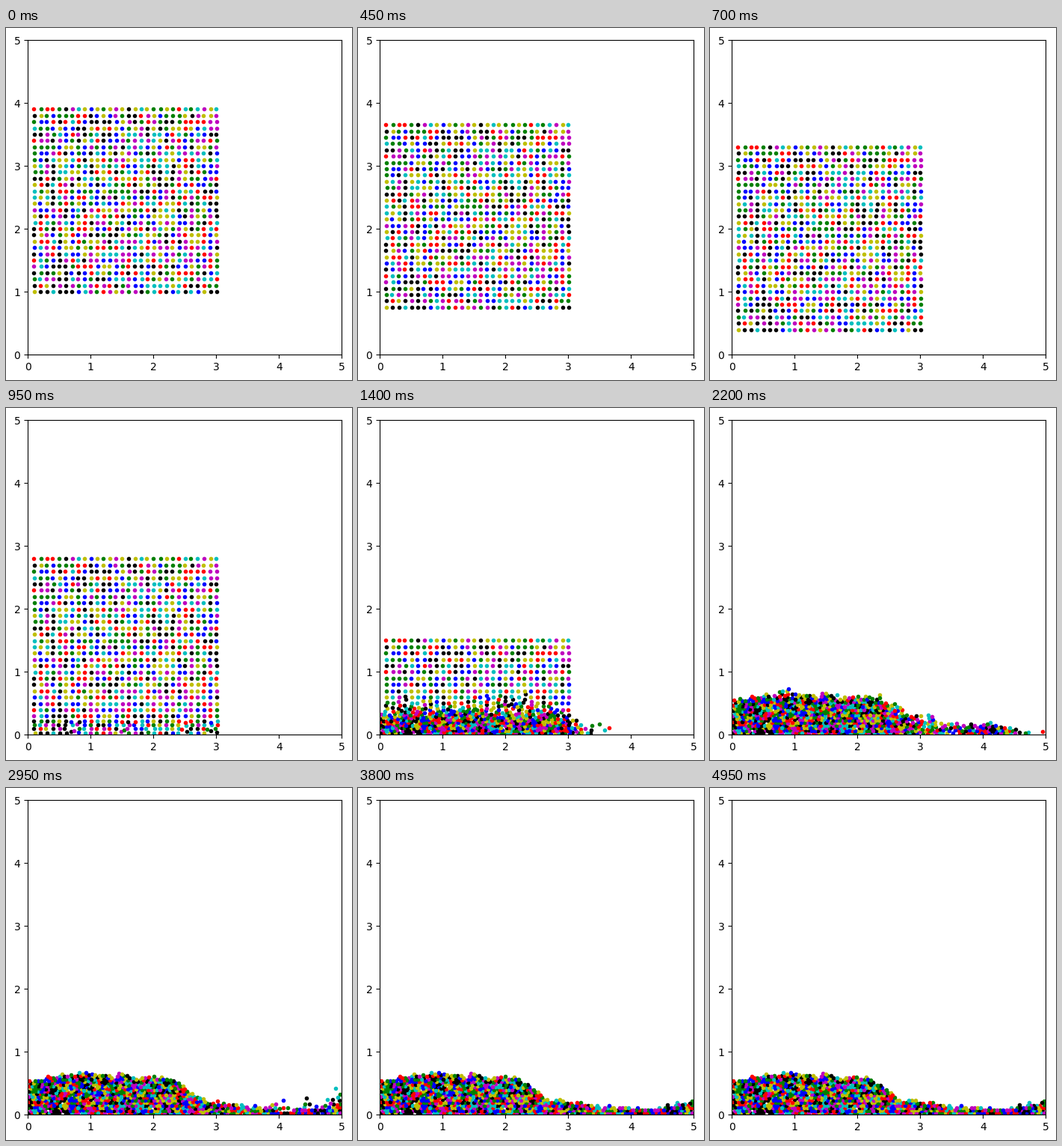
These frames come from a looping animation (463x470 px, 5 s). A matplotlib script:

```python
import numpy as np
import matplotlib.pyplot as plt
from matplotlib.animation import FuncAnimation

# Stage, in pixels
WIDTH, HEIGHT, DPI = 463, 470, 100
LEFT, RIGHT, BOTTOM, TOP = 29.0, 449.4, 33.5, 453.5
BOX = 5.0

# Time
FRAMES, INTERVAL = 100, 50
STEPS = 70
DT = 0.025 / STEPS

# Grains of unit mass
SIDE = 30
N = SIDE * SIDE
RADIUS = 0.024
REACH = 0.08
GRAVITY = np.array([0.0, -9.81])
STIFF, DAMP = 1e6, 85.0
SHEAR_STIFF, SHEAR_DAMP = 5e5, 40.0
GRAIN_FRICTION, WALL_FRICTION = 0.25, 0.15

IDS = np.arange(N)
WALL_NORMALS = np.repeat([[0.0, 1.0], [1.0, 0.0], [-1.0, 0.0]], N, axis=0)
WALL_FIRST = np.tile(IDS, 3)
WALL_SECOND = np.repeat([N, N + 1, N + 2], N)


def start_grid(rng):
    """Square block of grains with a little sideways jitter."""
    row, col = np.divmod(IDS, SIDE)
    x = 0.1 * (col + 1) + rng.uniform(0, 0.02, N)
    return np.column_stack([x, 1 + 0.1 * row])


def close_pairs(pos):
    """Index pairs nearer than REACH, found by a sweep along x."""
    order = np.argsort(pos[:, 0])
    x, y = pos[order].T
    count = np.searchsorted(x, x + REACH) - IDS - 1
    a = np.repeat(IDS, count)
    b = a + 1 + np.arange(count.sum()) - np.repeat(np.cumsum(count) - count, count)
    near = np.hypot(x[a] - x[b], y[a] - y[b]) < REACH
    a, b = order[a[near]], order[b[near]]
    return np.minimum(a, b), np.maximum(a, b)


class Grains:
    def __init__(self, pos):
        self.pos = pos
        self.vel = np.zeros((N + 3, 2))  # the last three are the still walls
        self.memory = np.zeros(N * (N + 3))
        self.keys = np.zeros(0, int)
        self.slip = np.zeros(0)
        self.find_contacts()

    def find_contacts(self):
        self.a, self.b = close_pairs(self.pos)
        self.first = np.concatenate([self.a, WALL_FIRST])
        self.second = np.concatenate([self.b, WALL_SECOND])
        self.friction = np.full(len(self.first), WALL_FRICTION)
        self.friction[:len(self.a)] = GRAIN_FRICTION
        # Carry the tangential springs over to the new list
        keys = self.first * (N + 3) + self.second
        self.memory[self.keys] = self.slip
        slip = self.memory[keys]
        self.memory[self.keys] = 0
        self.keys, self.slip = keys, slip
        self.anchor = self.pos.copy()

    def contact_force(self):
        x, y = self.pos.T
        apart = self.pos[self.a] - self.pos[self.b]
        dist = np.hypot(apart[:, 0], apart[:, 1])
        gap = np.concatenate([dist - 2 * RADIUS, y - RADIUS,
                              x - RADIUS, BOX - x - RADIUS])
        hit = np.flatnonzero(gap < 0)
        normals = np.concatenate([apart / dist[:, None], WALL_NORMALS])
        nx, ny = normals[hit].T
        i, j = self.first[hit], self.second[hit]
        vx, vy = (self.vel[i] - self.vel[j]).T

        push = np.maximum(-STIFF * gap[hit] - DAMP * (vx * nx + vy * ny), 0)
        limit = self.friction[hit] * push
        slide = vy * nx - vx * ny
        stretch = self.slip[hit] + slide * DT
        drag = np.clip(-SHEAR_STIFF * stretch - SHEAR_DAMP * slide, -limit, limit)
        self.slip[:] = 0
        self.slip[hit] = np.clip(stretch, -limit / SHEAR_STIFF, limit / SHEAR_STIFF)

        parts = (push * nx - drag * ny, push * ny + drag * nx)
        total = [np.bincount(i, f, N + 3) - np.bincount(j, f, N + 3) for f in parts]
        return np.column_stack(total)[:N]

    def step(self):
        moved = self.pos - self.anchor
        if (moved ** 2).sum(axis=1).max() > 0.011 ** 2:
            self.find_contacts()
        self.vel[:N] += (self.contact_force() + GRAVITY) * DT
        self.pos += self.vel[:N] * DT


def simulate(rng):
    grains = Grains(start_grid(rng))
    poses = [grains.pos.copy()]
    for _ in range(FRAMES - 1):
        for _ in range(STEPS):
            grains.step()
        poses.append(grains.pos.copy())
    return poses


def on_pixels(pos):
    """Move positions to the centres of their pixels."""
    origin = np.array([LEFT, BOTTOM])
    scale = np.array([RIGHT - LEFT, TOP - BOTTOM]) / BOX
    return (np.floor(origin + pos * scale) + 0.5 - origin) / scale


rng = np.random.default_rng(4)
colors = rng.choice(list("bgrcmyk"), N)
poses = simulate(rng)

# The tiny surplus keeps the pixel size from being rounded down
fig = plt.figure(figsize=((WIDTH + 1e-6) / DPI, (HEIGHT + 1e-6) / DPI), dpi=DPI)
ax = fig.add_axes([LEFT / WIDTH, BOTTOM / HEIGHT,
                   (RIGHT - LEFT) / WIDTH, (TOP - BOTTOM) / HEIGHT])
dots = ax.scatter(*on_pixels(poses[0]).T, s=9, c=colors, linewidths=1, zorder=2)
ax.set(xlim=(0, BOX), ylim=(0, BOX), xticks=range(6), yticks=range(6))


def draw(frame):
    dots.set_offsets(on_pixels(poses[frame]))
    return (dots,)


anim = FuncAnimation(fig, draw, frames=FRAMES, interval=INTERVAL,
                     repeat=True, repeat_delay=0)
plt.show()
```
